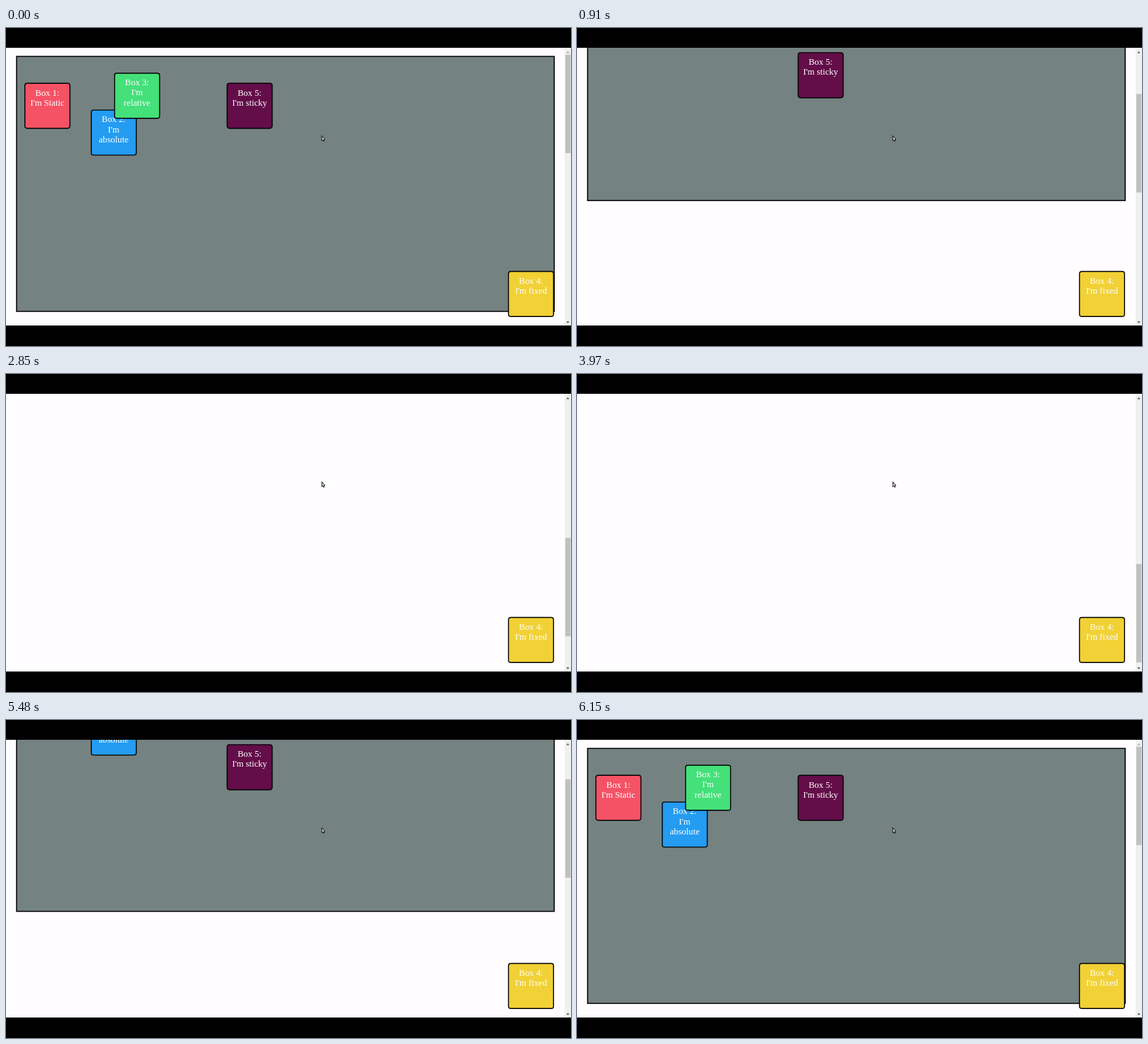
An HTML page that plays this animation: 800 px wide and 450 px high, repeating every 6.21 s.

```html
<!DOCTYPE html>
<html lang="en">
<head>
<meta charset="utf-8">
<title>CSS positions</title>
<style>
  html, body { margin: 0; width: 100%; height: 100%; overflow: hidden; background: #000; }
  svg { display: block; width: 100%; height: 100%; }
  text { font: 12.6px "Liberation Serif", "Times New Roman", serif; fill: #fff; text-anchor: middle; }
</style>
</head>
<body>
<svg id="stage" viewBox="0 0 800 450">
  <rect y="28" width="800" height="393" fill="#fffdff"/>
  <clipPath id="view"><rect y="28" width="791" height="393"/></clipPath>
  <g clip-path="url(#view)">
    <g id="page">
      <rect x="15" y="40.2" width="761.2" height="360.8" fill="#748281" stroke="#000" stroke-width="1.5"/>
    </g>
  </g>
  <rect x="791" y="28" width="9" height="393" fill="#f1f0f1"/>
  <rect id="thumb" x="792" width="7.3" height="139.3" fill="#c1c0c1"/>
  <path id="up" d="M793.3 35.4h4.4l-2.2-2.5z"/>
  <path id="down" d="M793.3 415.2h4.4l-2.2 2.5z"/>
  <path d="M447.2 152.5v7.2l1.6-1.4 1 2 .9-.4-.8-2 1.6-.3z" fill="#ddd" stroke="#000" stroke-width=".9"/>
</svg>
<script>
const LOOP = 6210;
const MAX_SCROLL = 661;
const NS = "http://www.w3.org/2000/svg";
const $ = id => document.getElementById(id);

// [time, scroll, speed in px/ms]
const KEYS = [
  [10, 0, 0], [640, 85, .12], [910, 156.4, .46], [1270, 282, 0],
  [1530, 282, 0], [1730, 322, .45], [2090, 469, 0],
  [2490, 469, 0], [2850, 548, .38], [3120, 641, .22], [3270, MAX_SCROLL, 0],
  [3850, MAX_SCROLL, 0], [4500, 475, -.47], [4790, 339.5, -.41],
  [5480, 130.5, -.27], [6150, 0, 0]
];

function add(parent, tag, attrs, content = "") {
  const el = document.createElementNS(NS, tag);
  for (const name in attrs) el.setAttribute(name, attrs[name]);
  el.textContent = content;
  return parent.appendChild(el);
}

function addBox(parent, x, y, fill, ...lines) {
  const box = add(parent, "g", { transform: `translate(${x} ${y})` });
  add(box, "rect", {
    x: .7, y: .7, width: 63.8, height: 63.8, rx: 3.4,
    fill, stroke: "#000", "stroke-width": 1.4
  });
  lines.forEach((line, i) => add(box, "text", { x: 32.5, y: 18 + i * 14.2 }, line));
  return box;
}

const page = $("page");
const view = page.parentNode;
addBox(page, 26, 77.5, "#f55265", "Box 1:", "I'm Static");
addBox(page, 120, 115.4, "#249cf1", "Box 2:", "I'm", "absolute");
addBox(page, 153, 63.3, "#44e079", "Box 3:", "I'm", "relative");
const sticky = addBox(view, 312.4, 77.5, "#630d49", "Box 5:", "I'm sticky");
addBox(view, 710.8, 343.8, "#f1d135", "Box 4:", "I'm fixed");

// Cubic Hermite curve through the keys
function scrollAt(t) {
  const next = KEYS.findIndex(key => key[0] > t);
  if (next < 1) return 0;
  const [t0, s0, v0] = KEYS[next - 1];
  const [t1, s1, v1] = KEYS[next];
  const span = t1 - t0, u = (t - t0) / span, w = 1 - u;
  return w * w * ((1 + 2 * u) * s0 + u * span * v0)
       + u * u * ((1 + 2 * w) * s1 - w * span * v1);
}

function render(t) {
  const scroll = scrollAt(t);
  const stickyTop = Math.max(77.5 - scroll, Math.min(34.2, 312 - scroll));
  page.setAttribute("transform", `translate(0 ${-scroll})`);
  sticky.setAttribute("transform", `translate(312.4 ${stickyTop})`);
  $("thumb").setAttribute("y", 37.8 + scroll * .354);
  $("up").setAttribute("fill", scroll < .5 ? "#a3a3a3" : "#505050");
  $("down").setAttribute("fill", scroll > MAX_SCROLL - .5 ? "#a3a3a3" : "#505050");
}

const start = performance.now();
function tick() {
  render((performance.now() - start) % LOOP);
  requestAnimationFrame(tick);
}
tick();
</script>
</body>
</html>
```
